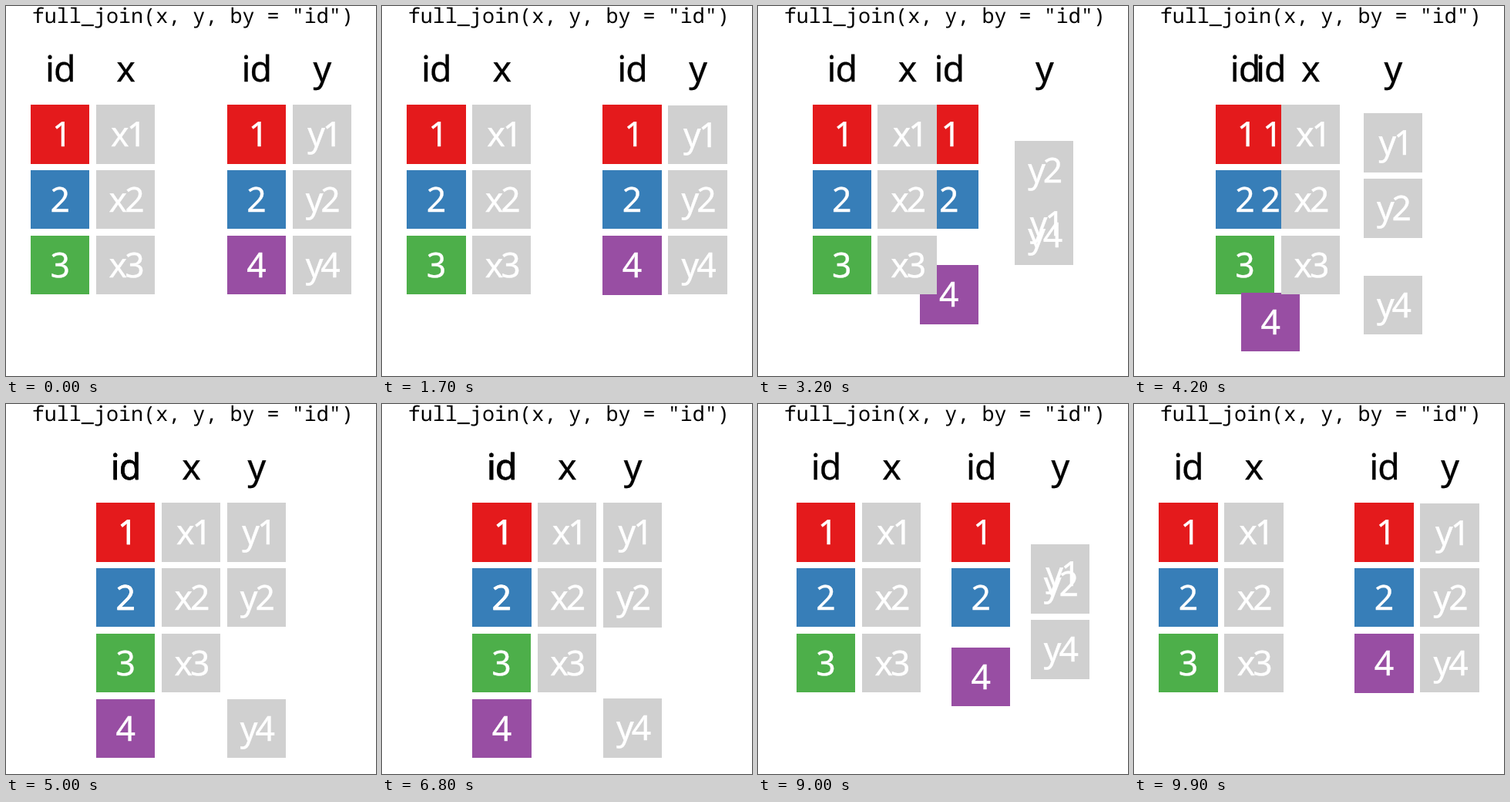
These frames come from a looping animation (480 px wide and 480 px high, 10 s). An HTML page:

```html
<!DOCTYPE html>
<html lang="en">
<head>
<meta charset="utf-8">
<title>Full join</title>
<style>
  html, body { margin: 0; width: 100%; height: 100%; overflow: hidden; background: #fff; }
  svg { display: block; width: 100vw; height: 100vh; }
  text { text-anchor: middle; text-rendering: geometricPrecision; font-family: "Noto Sans", "Open Sans", sans-serif; }
  .title { font: 26.75px "Noto Sans Mono", "DejaVu Sans Mono", monospace; }
  .head { font-size: 46.5px; letter-spacing: -1px; stroke: #000; stroke-width: 0.3px; }
  .cell { font-size: 44.5px; fill: #fff; stroke: #fff; stroke-width: 0.4px; }
  .pair { letter-spacing: -3px; }
  rect { shape-rendering: crispEdges; }
</style>
</head>
<body>
<svg viewBox="0 0 480 480">
  <text class="title" x="242.3" y="22">full_join(x, y, by = "id")</text>
  <g id="tiles"></g>
  <g id="labels"></g>
</svg>
<script>
const LOOP = 10000, STEP = 100;
const PITCH = 84.88, SIZE = PITCH * 0.9, LEFT = 240 - 2.45 * PITCH, TOP = 128.18;
const GREY = "#d0d0d0";
const COLORS = { 1: "#e41a1c", 2: "#377eb8", 3: "#4daf4a", 4: "#984ea3" };

const tiles = document.getElementById("tiles");
const labels = document.getElementById("labels");

function add(parent, tag, attrs) {
  const el = document.createElementNS("http://www.w3.org/2000/svg", tag);
  for (const key in attrs) el.setAttribute(key, attrs[key]);
  return parent.appendChild(el);
}

// Columns and rows are given in grid units as [apart, joined].
const items = [];

function head(label, col) {
  const text = add(labels, "text", { class: "head", y: 97.5 });
  items.push({ text, col, names: [label, label] });
}

function cell(names, col, row, fill) {
  const rect = add(tiles, "rect", { width: SIZE, height: SIZE, fill });
  const text = add(labels, "text", { class: names[0].length > 1 ? "cell pair" : "cell" });
  items.push({ rect, text, col, row, names });
}

const ID_X = [0, 1], X = [1, 2], ID_Y = [3, 1], Y = [4, 3];

head("id", ID_X);
head("x", X);
head("id", ID_Y);
head("y", Y);

["1", "2", "3"].forEach((id, i) => cell([id, id], ID_X, [i, i], COLORS[id]));
["1", "2", "4"].forEach((id, i) => cell([id, id], ID_Y, [i, id - 1], COLORS[id]));
["x1", "x2", "x3"].forEach((name, i) => cell([name, name], X, [i, i], GREY));
// The y tiles trade rows, and their labels swap halfway.
cell(["y1", "y4"], Y, [0, 3], GREY);
cell(["y2", "y1"], Y, [1, 0], GREY);
cell(["y4", "y2"], Y, [2, 1], GREY);

const clamp = v => Math.min(1, Math.max(0, v));
const ease = p => (1 - Math.cos(Math.PI * p)) / 2;
const mix = ([a, b], u) => a + (b - a) * u;

// 0 = tables apart, 1 = joined
function progress(t) {
  return t < 5000 ? clamp((t - 1600) / 3400) : 1 - clamp((t - 6700) / 3300);
}

// Optical centring for the narrow digit 1
const nudge = name => name.endsWith("1") ? 2.5 : 0;

function draw(t) {
  const p = progress(t), u = ease(p);
  for (const { rect, text, col, row, names } of items) {
    const x = LEFT + PITCH * mix(col, u);
    const name = names[p < 0.5 ? 0 : 1];
    if (text.textContent !== name) text.textContent = name;
    text.setAttribute("x", x + SIZE / 2 + nudge(name));
    if (!rect) continue;
    const y = TOP + PITCH * mix(row, u);
    rect.setAttribute("x", x);
    rect.setAttribute("y", y);
    text.setAttribute("y", y + 54);
  }
}

const start = performance.now();

function tick() {
  const t = (performance.now() - start) % LOOP;
  draw(Math.floor(t / STEP) * STEP);
  requestAnimationFrame(tick);
}
tick();
</script>
</body>
</html>
```
